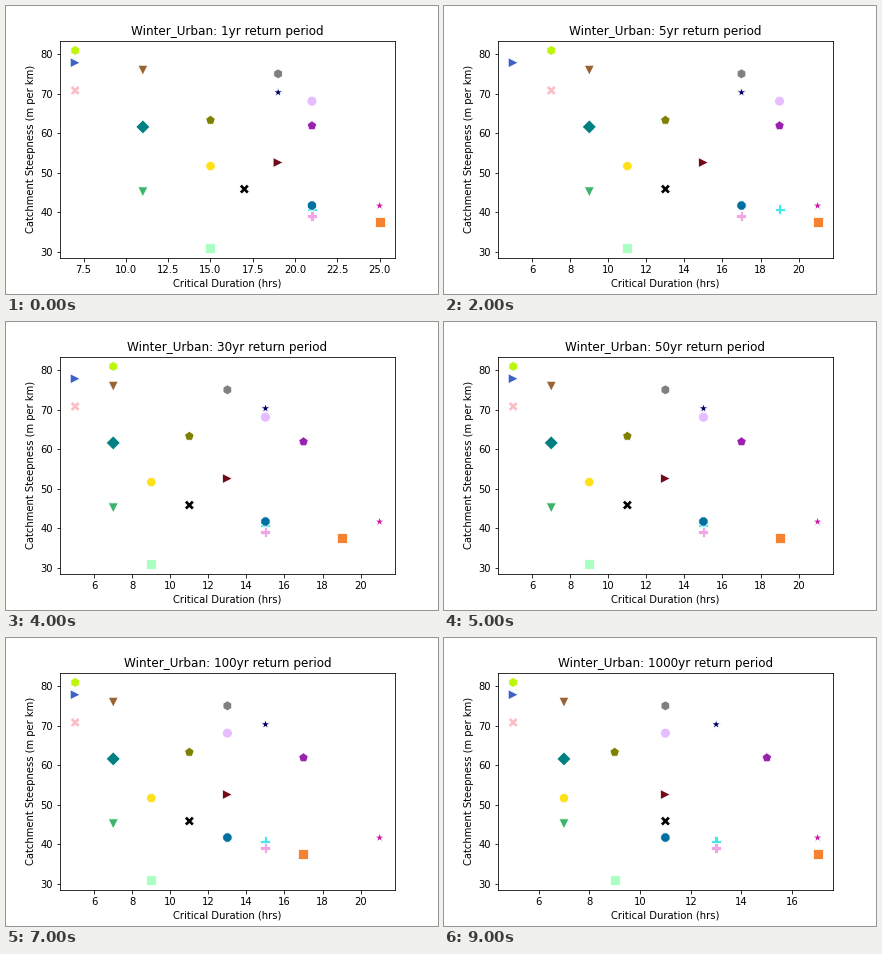
Write a matplotlib script that moves like this. It is 432 px wide and 288 px high and loops after 10 s.

```python
import matplotlib.pyplot as plt
import numpy as np
from matplotlib.animation import FuncAnimation
from matplotlib.markers import MarkerStyle

plt.rcParams["font.family"] = "DejaVu Sans"
plt.rcParams["font.size"] = 10

PERIODS = [1, 2, 5, 10, 30, 50, 75, 100, 200, 1000]

# marker, colour, steepness, first duration, steps at which it drops by 2 hrs
CATCHMENTS = [
    ("v", "#3cb46b", 45.2, 11, (1, 3)),
    ("8", "#ffe119", 51.7, 15, (1, 2, 3, 9)),
    (">", "#3c63c4", 77.8, 7, (2,)),
    ("s", "#f58231", 37.5, 25, (1, 2, 3, 6)),
    ("p", "#9a20b0", 61.9, 21, (2, 4, 9)),
    ("P", "#46e6ea", 40.8, 21, (2, 3, 4, 9)),
    ("*", "#c81fa8", 41.7, 25, (2, 2, 8, 9)),
    ("h", "#bcf60c", 80.9, 7, (5,)),
    ("X", "#fabec4", 70.8, 7, (4,)),
    ("D", "#008080", 61.6, 11, (1, 3)),
    ("o", "#e6beff", 68.1, 21, (2, 3, 4, 7, 9)),
    ("v", "#9a6334", 75.9, 11, (1, 3)),
    ("8", "#0070a0", 41.75, 21, (1, 2, 3, 7, 9)),
    (">", "#700a18", 52.6, 19, (1, 2, 3, 9)),
    ("s", "#aaffc3", 31.0, 15, (1, 2, 3)),
    ("p", "#808000", 63.3, 15, (1, 3, 9)),
    ("P", "#f0a5e4", 39.1, 21, (1, 2, 3, 8)),
    ("*", "#000068", 70.3, 19, (2, 3, 8)),
    ("h", "#808080", 75.0, 19, (2, 3, 4, 8)),
    ("X", "#000000", 45.9, 17, (1, 2, 3)),
]
markers, colors, steepness, start, drops = zip(*CATCHMENTS)


def durations(step):
    return np.array([s - 2 * sum(d <= step for d in ds)
                     for s, ds in zip(start, drops)], dtype=float)


def padded(values, margin=0.05):
    lo, hi = min(values), max(values)
    pad = margin * (hi - lo)
    return lo - pad, hi + pad


def marker_path(name):
    style = MarkerStyle(name)
    return style.get_path().transformed(style.get_transform())


fig, ax = plt.subplots(figsize=(6, 4), dpi=72)
fig.subplots_adjust(left=0.125, right=0.9, bottom=0.125, top=0.88)
ax.set_xlabel("Critical Duration (hrs)")
ax.set_ylabel("Catchment Steepness (m per km)")
ax.set_ylim(padded(steepness))
points = ax.scatter(durations(0), steepness, s=100, c=colors,
                    edgecolors="white", linewidths=0.8)
points.set_paths([marker_path(m) for m in markers])


def update(step):
    x = durations(step)
    points.set_offsets(np.column_stack([x, steepness]))
    ax.set_xlim(padded(x))
    ax.set_title(f"Winter_Urban: {PERIODS[step]}yr return period", fontsize=12)
    return [points]


anim = FuncAnimation(fig, update, frames=len(PERIODS), interval=1000,
                     init_func=lambda: update(0), repeat=True, repeat_delay=0)
plt.show()
```
